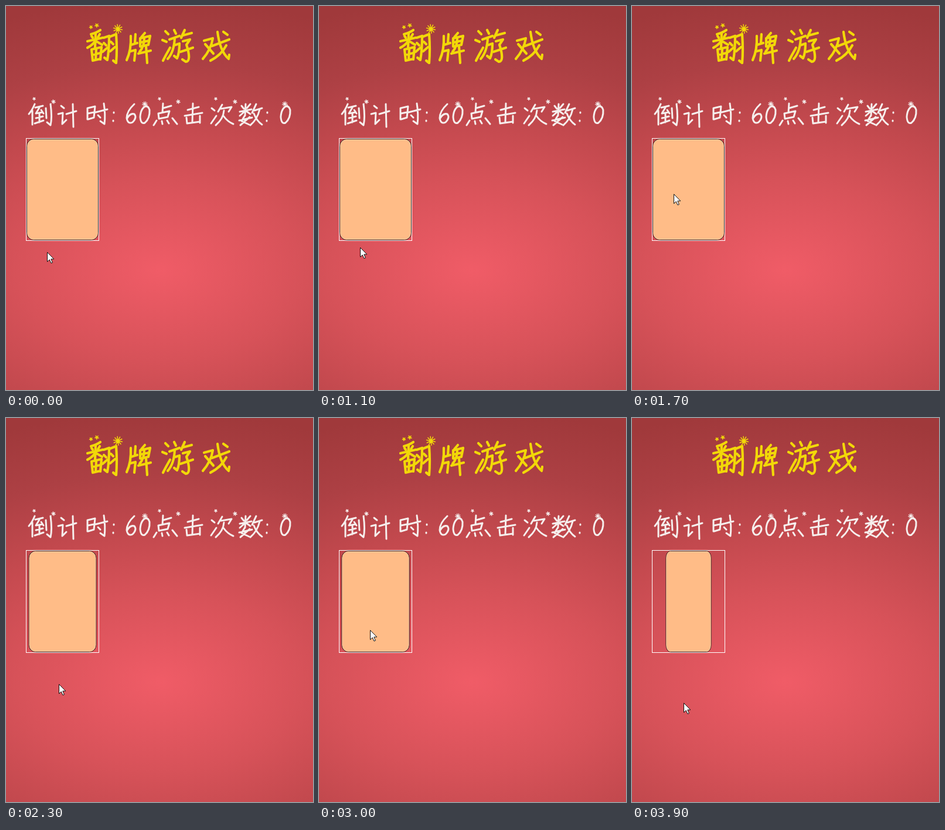
These frames come from a looping animation (524x654 px, 4 s). An HTML page:

```html
<!DOCTYPE html>
<html lang="zh">
<head>
<meta charset="utf-8">
<title>翻牌游戏</title>
<style>
html, body { margin: 0; width: 100%; height: 100%; overflow: hidden; background: #c4494f; }
svg { display: block; width: 524px; height: 654px; }
.ink { fill: none; stroke-linecap: round; stroke-linejoin: round; }
</style>
</head>
<body>
<svg viewBox="0 0 524 654" xmlns="http://www.w3.org/2000/svg">
  <defs>
    <radialGradient id="glow" gradientUnits="userSpaceOnUse" cx="0" cy="0" r="460"
      gradientTransform="translate(262 450) scale(1.6 1)">
      <stop offset="0" stop-color="#f05c67"/>
      <stop offset=".33" stop-color="#d75259"/>
      <stop offset=".55" stop-color="#c3494e"/>
      <stop offset=".77" stop-color="#ad4044"/>
      <stop offset="1" stop-color="#a0393b"/>
    </radialGradient>
  </defs>
  <rect width="524" height="654" fill="url(#glow)"/>
  <g id="title" class="ink" stroke="#f2d808" stroke-width="4.2" role="img" aria-label="翻牌游戏"></g>
  <g id="status" class="ink" stroke="#f6efed" stroke-width="3" role="img" aria-label="倒计时: 60 点击次数: 0"></g>
  <rect x="34.5" y="225.5" width="124" height="174" fill="none" stroke="#fff"/>
  <g id="card">
    <rect x="-61" y="226.5" width="122" height="172" rx="12" fill="#ffbc87" stroke="#2a1414" vector-effect="non-scaling-stroke"/>
    <rect x="-60" y="227.5" width="120" height="170" rx="11" fill="none" stroke="#ffd9b8" stroke-opacity=".6" vector-effect="non-scaling-stroke"/>
  </g>
  <path id="pointer" d="M.5.5V16.5L4.2 13 7 19 9.4 18 6.8 12H11.8Z" fill="#fff" stroke="#111"/>
</svg>
<script>
const $ = id => document.getElementById(id);
const LOOP = 4000, STEP = 100, TURN = 540;

// Brush strokes, one path per character
const titleInk = [
  'M161 41Q154 46 145 48M146 51L148 54M160 48L157 53M139 60L165 54M153 46L152 71M152 60Q147 67 139 71M154 60L164 66M146 74L148 93M146 74L163 70 161 91M148 83L161 80M154 73L153 92M148 93L161 90',
  'M167 54L176 51Q176 75 173 92L168 88M167 63L171 67M165 78L173 71M178 52L188 48Q190 75 188 97L183 93M179 61L183 65M178 77L186 70',
  'M213 51Q214 75 206 92M214 66L224 63M221 48L220 63M213 77L221 75 219 93',
  'M237 46L231 53M229 55L229 69M229 55L246 51 243 66M230 62L244 59M230 69L243 66M236 54Q236 69 228 78M226 81L247 76M239 69L241 97',
  'M272 43L277 48M267 58L274 61M268 93Q273 83 280 71M287 41L290 47M279 57L296 51M288 54Q287 78 276 90M287 67L296 64Q296 80 292 89L287 85',
  'M305 41L299 54M302 50L317 46M302 60L314 57 308 66M308 66Q317 94 307 95L301 91M298 78L319 71',
  'M338 59L353 55Q350 74 336 90M340 65L354 81M352 68L381 57M361 44Q365 77 380 90L381 83M376 67Q367 84 349 93M371 44L378 49'
];
const statusInk = [
  'M49 167Q45 177 39 184M45 178L45 202M50 173L63 170M57 173L51 183 62 181M60 177L64 183M51 191L63 188M57 183L57 198M49 200L64 195M68 174L69 191M76 167Q79 190 76 203L70 198',
  'M94 170L99 174M89 184L97 182 96 201 103 194M103 184L120 179M114 167L115 206',
  'M139 174L139 193M139 174L152 171 150 190M140 183L150 181M140 193L150 190M153 181L173 176M167 166Q170 185 168 201L161 196M157 186L161 190',
  'M184 181L184 182M183 195L183 196',
  'M219 167Q206 179 206 191Q208 202 216 198Q224 190 219 184Q212 182 207 191',
  'M240 170Q230 173 229 189Q230 202 237 199Q246 191 245 177Q243 170 238 171',
  'M268 166L267 181M268 174L282 170M260 183L261 192M260 183L279 179 276 189M261 192L276 189M257 195L252 203M266 196L267 201M275 195L278 200M284 191L292 201',
  'M310 177L329 172M319 166L318 198M305 187L335 182M308 190L309 200 331 197M331 187L331 199',
  'M351 174L356 178M350 200L359 187M369 168L362 180M367 175L385 172 380 180M372 178Q371 192 358 203M371 187Q378 197 388 201',
  'M402 170L406 175M417 167L411 174M399 180L419 176M409 167L408 187M408 179L399 187M410 179L417 184M408 186L402 196 415 202M416 189L400 203M398 195L420 190M427 167L420 182M424 178L437 174M433 176Q429 193 417 203M423 183Q428 196 437 202',
  'M446 181L446 182M445 195L445 196',
  'M480 170Q470 173 469 189Q470 202 477 199Q486 191 485 177Q483 170 478 171'
];

function burst(x, y, r, legs) {
  let d = '';
  for (let i = 0; i < legs; i++) {
    const a = (i + .3) * 2 * Math.PI / legs;
    d += `M${x} ${y}l${(r * Math.cos(a)).toFixed(1)} ${(r * Math.sin(a)).toFixed(1)}`;
  }
  return d;
}
const path = (d, w) => `<path d="${d}"${w ? ` stroke-width="${w}"` : ''}/>`;
const stars = (list, w) => list.map(([x, y, r, n]) => path(burst(x, y, r, n), w)).join('');

$('title').innerHTML = titleInk.map(d => path(d)).join('') +
  stars([[145, 36, 2.5, 5], [155, 33, 3, 5]], 1.7) +
  stars([[191, 39, 7.5, 10]], 1.5) + path('M191 39v1', 6);
$('status').innerHTML = statusInk.map(d => path(d)).join('') +
  stars([[48, 158, 2.2, 5], [262, 158, 2.2, 5], [358, 158, 2.2, 5],
    [81, 163, 3, 6], [294, 163, 3, 6], [391, 163, 3, 6]], 1.6) +
  stars([[237, 167, 4.3, 9], [476, 167, 4.3, 9]], 1.1);

// Pointer stops: time, x, y
const stops = [
  [0, 70, 419], [1050, 70, 419], [1170, 70, 399], [1300, 71, 355], [1400, 71, 320],
  [1800, 71, 320], [1900, 79, 361], [1972, 84, 399], [2100, 89, 438], [2300, 90, 453],
  [2500, 90, 458], [2800, 89, 456], [2942, 88, 399], [3000, 87, 361], [3550, 87, 361],
  [3670, 87, 399], [3700, 87, 420], [3900, 88, 485], [4000, 88, 485]
];
// Turns: start time, from angle, to angle
const turns = [[1170, 0, 180], [1972, 180, 0], [2942, 0, 180], [3670, 180, 0]];

// cubic-bezier(.25, .1, .25, 1)
function ease(p) {
  if (p >= 1) return 1;
  const curve = (u, a, b) => 3 * a * u * (1 - u) ** 2 + 3 * b * u * u * (1 - u) + u ** 3;
  let lo = 0, hi = 1;
  for (let i = 0; i < 24; i++) {
    const mid = (lo + hi) / 2;
    if (curve(mid, .25, .25) < p) lo = mid; else hi = mid;
  }
  return curve(lo, .1, 1);
}

function angleAt(t) {
  const turn = turns.filter(k => k[0] <= t).pop();
  if (!turn) return 0;
  const [start, from, to] = turn;
  return from + (to - from) * ease((t - start) / TURN);
}

function pointerAt(t) {
  const i = stops.findIndex(k => k[0] > t);
  const [t0, x0, y0] = stops[i - 1], [t1, x1, y1] = stops[i];
  const p = (t - t0) / (t1 - t0);
  return [x0 + (x1 - x0) * p, y0 + (y1 - y0) * p].map(Math.round);
}

function draw(ms) {
  const t = Math.floor((ms % LOOP) / STEP) * STEP;
  const width = Math.abs(Math.cos(angleAt(t) * Math.PI / 180));
  $('card').setAttribute('transform', `translate(96.5 0) scale(${Math.max(width, .005)} 1)`);
  $('pointer').setAttribute('transform', `translate(${pointerAt(t)})`);
}

const begin = performance.now();
function tick() {
  draw(performance.now() - begin);
  requestAnimationFrame(tick);
}
tick();
</script>
</body>
</html>
```
